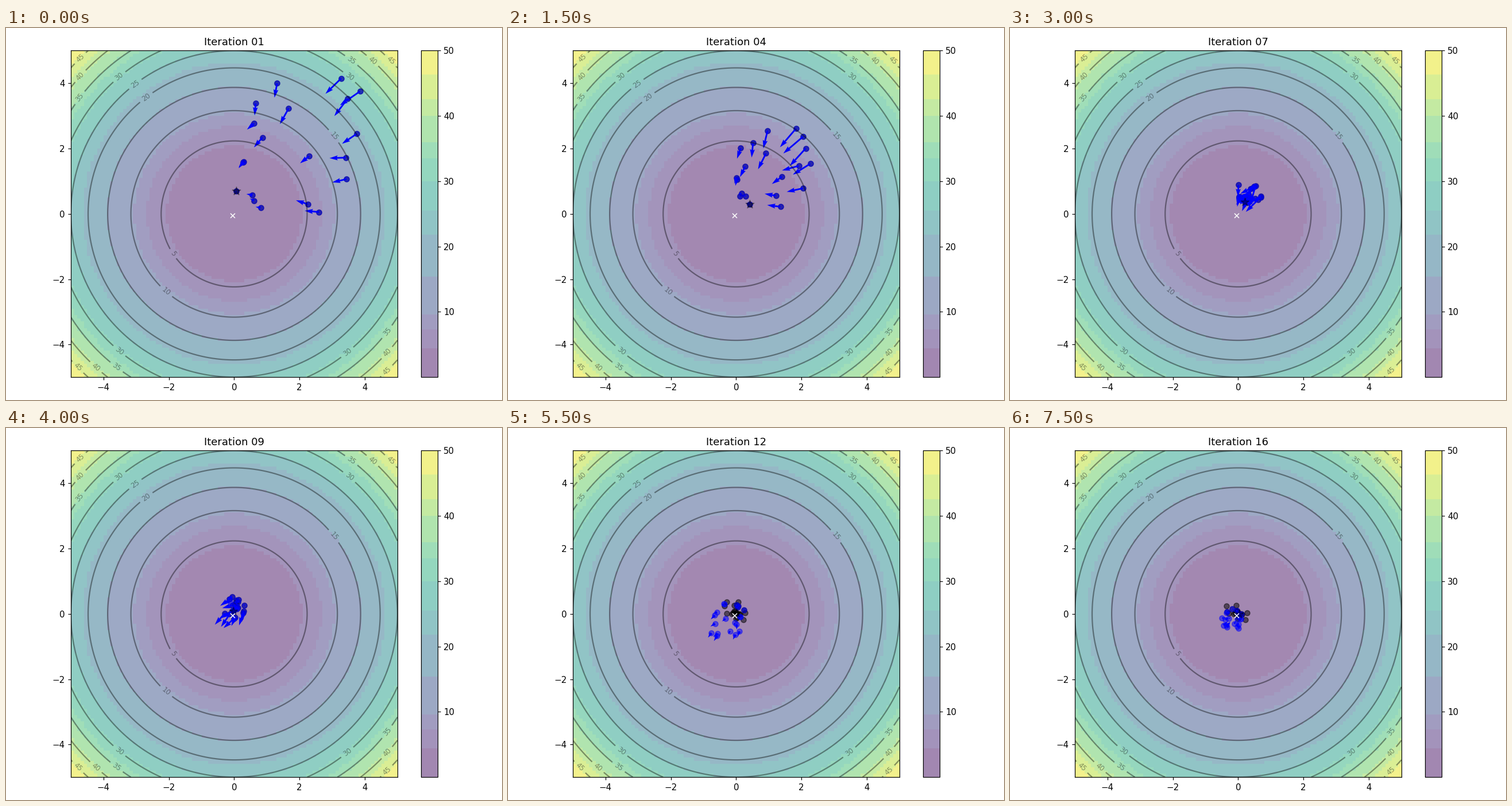
A matplotlib script that plays this animation: 864 px wide and 648 px high, repeating every 8000 ms.

```python
import numpy as np
import matplotlib.pyplot as plt
from matplotlib.animation import FuncAnimation
from matplotlib.colors import ListedColormap

FRAMES, STEP_MS = 16, 500
WIDTH, HEIGHT, DPI = 864, 648, 108
PARTICLES = 20
W, C1, C2 = 0.8, 0.1, 0.1
LABELS = [
    (-1.87, -1.22), (-2.08, -2.37), (3.07, 2.40), (-2.70, 3.58), (-3.03, 3.98),
    (-3.52, 4.20), (3.53, 4.20), (-3.52, -4.20), (3.46, -4.23),
    (-4.74, 3.57), (3.60, 4.72), (-3.60, -4.69), (4.67, -3.60),
    (-4.72, 4.23), (4.25, 4.71), (-4.23, -4.69), (4.67, -4.24),
    (-4.73, 4.79), (4.81, 4.72), (-4.79, -4.70), (4.67, -4.80),
]


def f(x, y):
    return x**2 + y**2


def swarm(steps):
    """Positions, velocities and bests of the swarm after each step."""
    np.random.seed(100)
    X = np.random.rand(2, PARTICLES) * 5
    V = np.random.randn(2, PARTICLES) * 0.1
    pbest, pbest_obj = X.copy(), f(*X)
    gbest = pbest[:, pbest_obj.argmin()]
    states = []
    for _ in range(steps):
        r1, r2 = np.random.rand(2)
        V = W * V + C1 * r1 * (pbest - X) + C2 * r2 * (gbest[:, None] - X)
        X = X + V
        obj = f(*X)
        better = obj <= pbest_obj
        pbest = np.where(better, X, pbest)
        pbest_obj = np.minimum(obj, pbest_obj)
        gbest = pbest[:, pbest_obj.argmin()]
        states.append((X, V, pbest, gbest))
    return states


def banded(name, edges, n=1000):
    """Colormap with one flat colour between neighbouring edges."""
    edges = np.array(edges) / edges[-1]
    band = np.searchsorted(edges, (np.arange(n) + 0.5) / n) - 1
    mids = (edges[:-1] + edges[1:]) / 2
    return ListedColormap(plt.get_cmap(name)(mids[band]))


def place(ax, left, top, w, h):
    """Put axes at a box in pixels, measured from the top left."""
    ax.set_position([left / WIDTH, 1 - (top + h) / HEIGHT, w / WIDTH, h / HEIGHT])


# The swarm has already moved once when the first picture appears.
states = swarm(FRAMES + 1)[1:]

x, y = np.meshgrid(np.linspace(-5, 5, 100), np.linspace(-5, 5, 100))
z = f(x, y)
lowest = z.argmin()
cmap = banded("viridis", [0, 4.4, 7.3, 9.6, 15.4, 21.8, 25.5, 30, 33.5,
                          36, 40, 42.6, 46.3, 50])

fig, ax = plt.subplots(figsize=(WIDTH / DPI, HEIGHT / DPI), dpi=DPI)
img = ax.imshow(z, extent=[-5, 5, -5, 5], origin="lower", cmap=cmap, alpha=0.5)
bar = fig.colorbar(img, ax=ax)
ax.plot(x.flat[lowest], y.flat[lowest], marker="x", markersize=5, color="white")
contours = ax.contour(x, y, z, 10, colors="black", alpha=0.4)
ax.clabel(contours, inline=True, fontsize=8, fmt="%.0f", manual=LABELS)

X, V, pbest, gbest = states[0]
pbest_plot = ax.scatter(*pbest, marker="o", color="black", alpha=0.5)
p_plot = ax.scatter(*X, marker="o", color="blue", alpha=0.5)
p_arrow = ax.quiver(*X, *V, color="blue", width=0.005,
                    angles="xy", scale_units="xy", scale=1)
gbest_plot = ax.scatter(*gbest, marker="*", s=100, color="black", alpha=0.4)
ax.set_xlim(-5, 5)
ax.set_ylim(-5, 5)
title = ax.set_title("Iteration 01")

SIDE = 568.8
place(ax, 113, 39.4, SIDE, SIDE)
place(bar.ax, 723.3, 39.4, SIDE / 20, SIDE)


def animate(i):
    X, V, pbest, gbest = states[i]
    title.set_text(f"Iteration {i + 1:02d}")
    pbest_plot.set_offsets(pbest.T)
    p_plot.set_offsets(X.T)
    p_arrow.set_offsets(X.T)
    p_arrow.set_UVC(*V)
    gbest_plot.set_offsets(gbest)
    return title, pbest_plot, p_plot, p_arrow, gbest_plot


anim = FuncAnimation(fig, animate, frames=FRAMES, interval=STEP_MS,
                     init_func=lambda: animate(0), repeat=True,
                     repeat_delay=0, blit=False)
plt.show()
```
